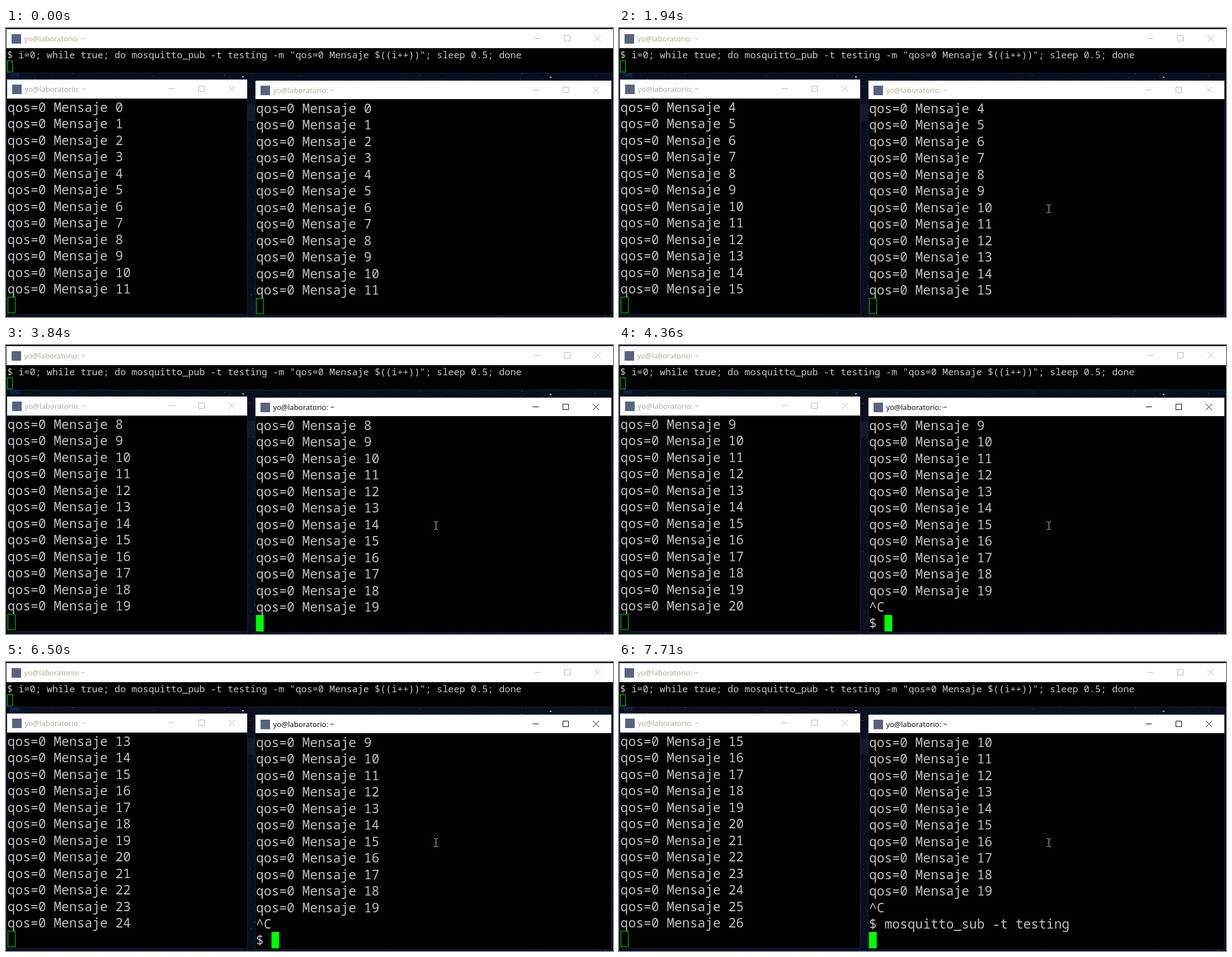
Animation of 1085 by 516 pixels, one loop 8 s. Source, as an HTML page with a canvas:

```html
<!DOCTYPE html>
<html lang="es">
<head>
<meta charset="utf-8">
<title>Terminales</title>
<style>
  html, body { margin: 0; width: 100%; height: 100%; overflow: hidden; background: #000; }
  canvas { display: block; }
</style>
</head>
<body>
<canvas id="stage" width="1085" height="516"></canvas>
<script>
const ctx = document.getElementById('stage').getContext('2d');
const LOOP = 8000;
const TITLE = 'yo@laboratorio: ~';
const COMMAND = '$ i=0; while true; do mosquitto_pub -t testing -m "qos=0 Mensaje $((i++))"; sleep 0.5; done';
const TICKS = [130, 660, 1190, 1730, 2270, 2810, 3310, 3840, 4360, 4890, 5440, 5970, 6500, 7050, 7580];
const FOCUS = 2200, INTERRUPT = 3970, RECALL = 7180, ENTER = 7710;
const MOVE = { start: 1450, step: 70, steps: 7, from: [746, 3], to: [768, 322] };
const ROWS = 13, ROW_H = 29.45, CELL = 13.79;

function rect(x, y, w, h, color) {
  ctx.fillStyle = color;
  ctx.fillRect(x, y, w, h);
}

function text(str, x, y, font, color) {
  ctx.font = font;
  ctx.fillStyle = color;
  ctx.fillText(str, x, y);
}

function stroke(path, color, width = 1) {
  ctx.strokeStyle = color;
  ctx.lineWidth = width;
  ctx.stroke(new Path2D(path));
}

// Night sky visible in the gaps between the windows
function desktop(active) {
  rect(0, 0, 1085, 516, active ? '#090f1e' : '#070f22');
  let seed = 7;
  const rnd = () => (seed = seed * 16807 % 2147483647) / 2147483647;
  const speckle = (x, y, w, h, count) => {
    for (let i = 0; i < count; i++) {
      const px = x + Math.floor(rnd() * w), py = y + Math.floor(rnd() * h), v = rnd();
      const color = v > 0.992 ? '#7a8395' : v > 0.5 ? '#111c32' : '#050914';
      rect(px, py, 1, 1, color);
    }
  };
  speckle(0, 80, 1085, 14, 1500);
  rect(432, 136, 14, 30, '#141c30');
  speckle(432, 92, 14, 424, 1200);
  speckle(0, 511, 1085, 5, 500);
  for (const [x, y] of [[422, 86], [972, 87]]) {
    rect(x, y, 3, 2, '#b8c4d8');
  }
  rect(8, 81, 16, 6, '#0d2248');
}

// cx holds the centres of the minimise, maximise and close buttons
function frame(x, y, w, h, barH, cx, active) {
  rect(x - 1, y, w + 2, h + 1, '#20253a');
  rect(x, y, w, h, '#000');
  rect(x, y, w, barH, '#fff');
  const ink = active ? '#000' : '#b8b4a2';
  const mid = y + 17;
  rect(x + 9, mid - 8, 17, 17, '#59637f');
  text(TITLE, x + 31.5, mid + 5, '13.2px "Open Sans", "Noto Sans", sans-serif', active ? '#000' : '#aaa692');
  const [a, b, c] = cx, m = mid - 0.5;
  stroke(`M${a - 5.5} ${m}h11`, ink);
  stroke(`M${b - 5} ${m - 5}h10v10h-10z`, ink);
  stroke(`M${c - 5.5} ${m - 5.5}l11 11m0 -11l-11 11`, ink);
}

function cursor(x, y, w, h, solid) {
  if (solid) {
    rect(x, y, w, h, '#0f0');
  } else {
    ctx.strokeStyle = '#00dc00';
    ctx.lineWidth = 1;
    ctx.strokeRect(Math.round(x) + 0.5, Math.round(y) + 0.5, Math.round(w) - 1, Math.round(h) - 1);
  }
}

function terminal(lines, x, baseline, solid) {
  const shown = lines.slice(-ROWS);
  shown.forEach((line, i) =>
    text(line, x, baseline + i * ROW_H, '22.98px "Noto Sans Mono", monospace', '#c0c0c0'));
  const column = shown[shown.length - 1].length;
  cursor(x + column * CELL, baseline + (ROWS - 1) * ROW_H - 23.4, CELL, ROW_H, solid);
}

function messages(last) {
  return Array.from({ length: last + 1 }, (_, i) => `qos=0 Mensaje ${i}`);
}

function subscriberLines(t, last) {
  const lines = messages(Math.min(last, 19));
  if (t >= INTERRUPT) lines.push('^C', t >= RECALL ? '$ mosquitto_sub -t testing' : '$ ');
  if (t < INTERRUPT || t >= ENTER) lines.push('');
  return lines;
}

function pointer(t) {
  if (t < MOVE.start) return;
  const p = Math.min(Math.floor((t - MOVE.start) / MOVE.step) / MOVE.steps, 1);
  const e = p * p * (3 - 2 * p);
  const [x, y] = MOVE.from.map((v, i) => Math.round(v + (MOVE.to[i] - v) * e));
  const overText = (y >= 36 && y < 80) || y >= 128;
  if (overText) {
    stroke(`M${x - 3} ${y - 6.5}h2.5l1 1l1 -1h2.5M${x + 0.5} ${y - 6}v13M${x - 3} ${y + 7.5}h2.5l1 -1l1 1h2.5`, '#d8d8d8');
  } else {
    const arrow = `M${x} ${y}v16l4 -4l3 6l2 -1l-3 -6h5z`;
    ctx.fillStyle = '#fff';
    ctx.fill(new Path2D(arrow));
    stroke(arrow, '#000');
  }
}

function draw(t) {
  const active = t >= FOCUS;
  const last = 11 + TICKS.filter(tick => t >= tick).length;
  desktop(active);

  frame(1, 2, 1084, 78, 34, [950, 1003.5, 1057.5], false);
  text(COMMAND, 2, 53.5, '16.85px "Noto Sans Mono", monospace', '#c8c8c8');
  cursor(2, 58, 10, 21, false);

  frame(2, 92, 429, 419, 34, [296, 349.5, 403.5], false);
  terminal([...messages(last), ''], 2.6, 150, false);

  frame(446, 94, 636, 419, 33, [947, 1000.5, 1054.5], active);
  terminal(subscriberLines(t, last), 446.9, 152, active);

  pointer(t);
}

const start = performance.now();
function loop() {
  draw((performance.now() - start) % LOOP);
  requestAnimationFrame(loop);
}
loop();
</script>
</body>
</html>
```
